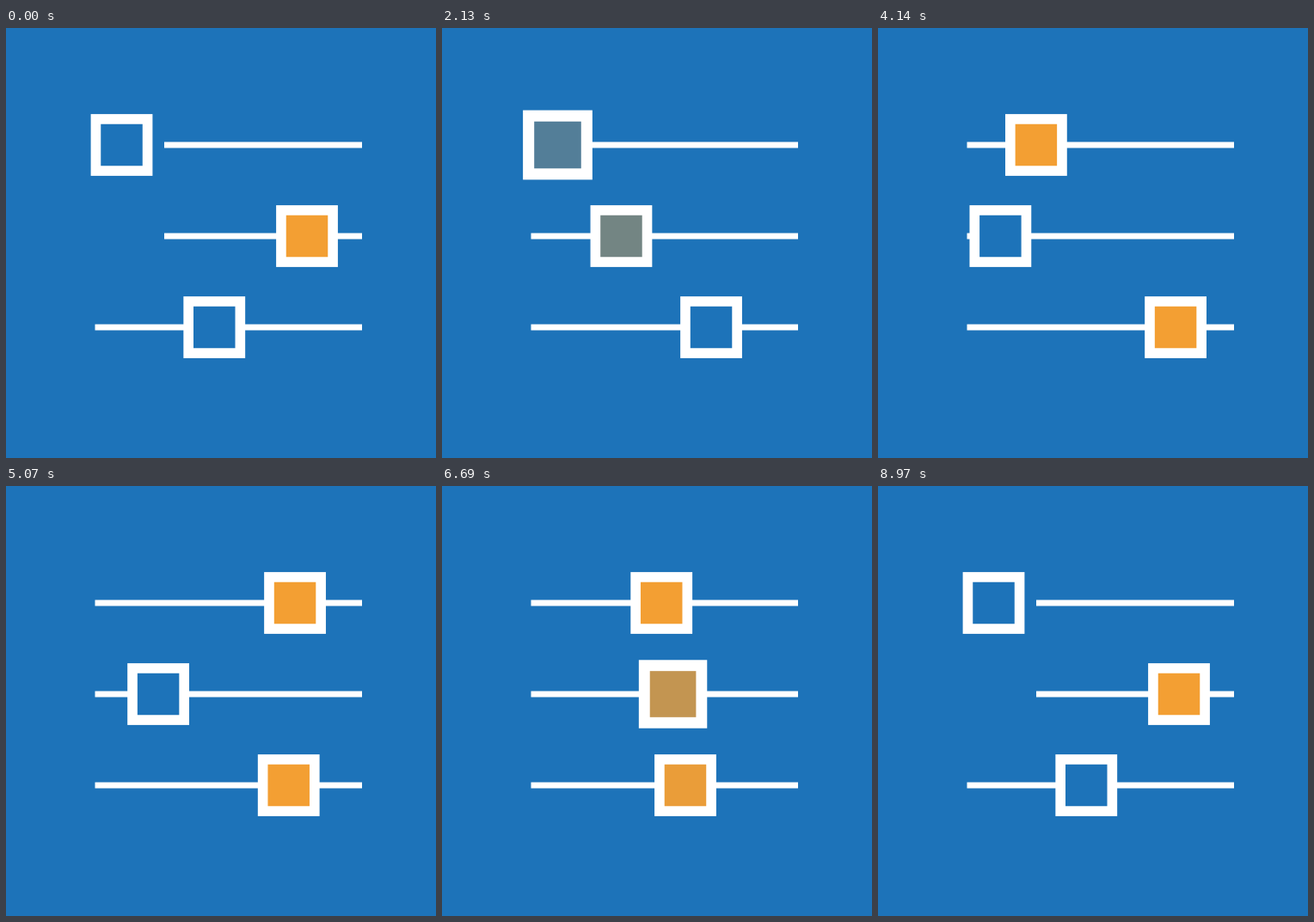
An HTML page that plays this animation: 500 px wide and 500 px high, repeating every 9000 ms.

```html
<!DOCTYPE html>
<html lang="en">
<head>
<meta charset="utf-8">
<title>Sliders</title>
<style>
  html, body { margin: 0; width: 100%; height: 100%; overflow: hidden; background: #1d73b9; }
  svg { display: block; width: 100vw; height: 100vh; }
</style>
</head>
<body>
<svg id="stage" viewBox="0 0 500 500"></svg>
<script>
const LOOP = 9000, STEP = 30;
const BLUE = [29, 115, 185], ORANGE = [243, 159, 51];
const LEFT = 134.5, MID = 242.25, RIGHT = 350;
const LINE_START = 103.5, LINE_END = 414;
const PULSE = 600, PEAK = 1.25;

// Tracks are [time, value] pairs; pulse is the time the knob pops.
const sliders = [
  {
    y: 136,
    knob: [[3600, LEFT], [5340, RIGHT], [8276, LEFT]],
    line: [[0, 184], [1770, 242], [2370, LINE_START], [8100, LINE_START], [8970, 184]],
    lit: [[1980, 0], [2580, 1], [7680, 1], [8280, 0]],
    pulse: 1980
  },
  {
    y: 242,
    knob: [[0, RIGHT], [3514, LEFT], [8970, RIGHT]],
    line: [[0, 184], [1770, LINE_START], [7266, LINE_START], [8970, 184]],
    lit: [[1770, 1], [2370, 0], [6225, 0], [6825, 1]],
    pulse: 6225
  },
  {
    y: 348,
    knob: [[0, MID], [3514, RIGHT], [8970, MID]],
    line: [[0, LINE_START]],
    lit: [[3510, 0], [4110, 1], [6665, 1], [7265, 0]],
    pulse: 3510
  }
];

const smooth = s => s * s * (3 - 2 * s);
const linear = s => s;

function sample(track, t, ease) {
  if (t <= track[0][0]) return track[0][1];
  for (let i = 1; i < track.length; i++) {
    const [t0, a] = track[i - 1], [t1, b] = track[i];
    if (t < t1) return a + (b - a) * ease((t - t0) / (t1 - t0));
  }
  return track[track.length - 1][1];
}

const mix = k => `rgb(${BLUE.map((c, i) => Math.round(c + (ORANGE[i] - c) * k))})`;

function add(parent, tag, attrs) {
  const el = document.createElementNS("http://www.w3.org/2000/svg", tag);
  for (const name in attrs) el.setAttribute(name, attrs[name]);
  return parent.appendChild(el);
}

const square = (parent, size, fill) =>
  add(parent, "rect", { x: -size / 2, y: -size / 2, width: size, height: size, fill });

const stage = document.getElementById("stage");
for (const s of sliders) {
  s.bar = add(stage, "rect", { y: s.y - 3.5, height: 7, fill: "#fff" });
  s.handle = add(stage, "g", {});
  square(s.handle, 71.8, "#fff");
  s.core = square(s.handle, 48.5, mix(0));
  s.scale = [[s.pulse, 1], [s.pulse + PULSE / 2, PEAK], [s.pulse + PULSE, 1]];
}

function draw(t) {
  for (const s of sliders) {
    const start = sample(s.line, t, smooth);
    s.bar.setAttribute("x", start);
    s.bar.setAttribute("width", LINE_END - start);
    const x = sample(s.knob, t, smooth), k = sample(s.scale, t, smooth);
    s.handle.setAttribute("transform", `translate(${x} ${s.y}) scale(${k})`);
    s.core.setAttribute("fill", mix(sample(s.lit, t, linear)));
  }
}

const origin = performance.now();
function tick() {
  const t = (performance.now() - origin) % LOOP;
  draw(Math.floor(t / STEP) * STEP);
  requestAnimationFrame(tick);
}
draw(0);
requestAnimationFrame(tick);
</script>
</body>
</html>
```
